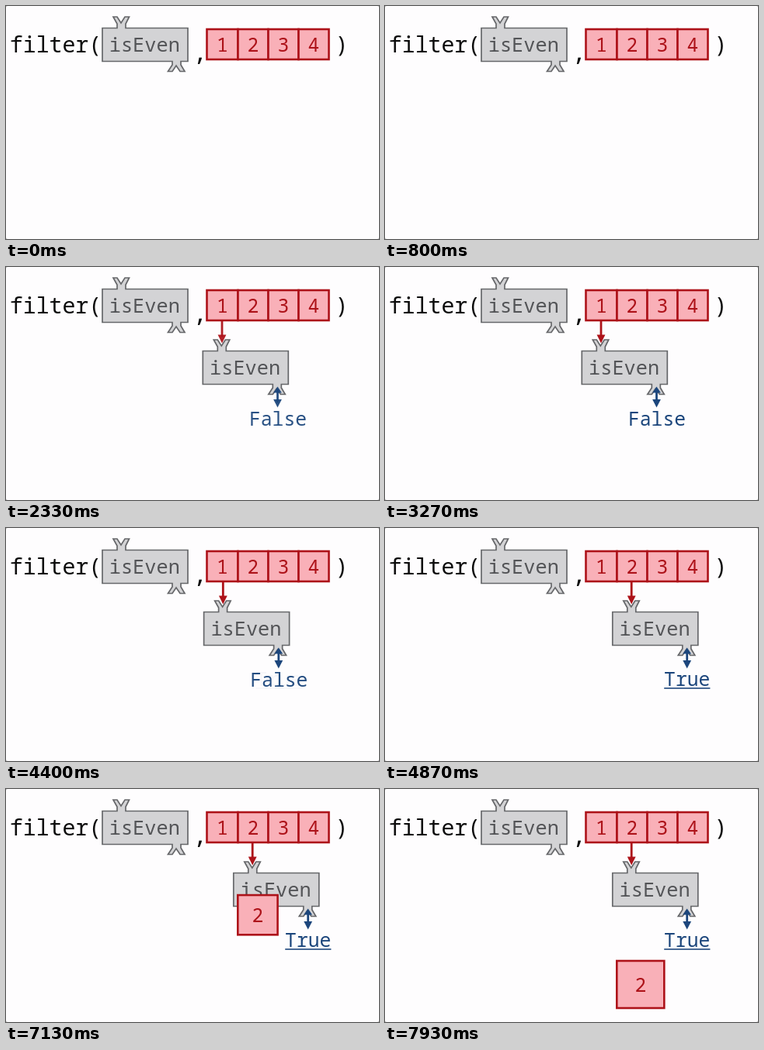
An HTML page with a canvas for the animation above (8 s loop, 480x301 px).

```html
<!DOCTYPE html>
<html lang="en">
<head>
<meta charset="utf-8">
<title>filter(isEven, list)</title>
<style>
html, body { margin: 0; width: 100%; height: 100%; overflow: hidden; background: #fefdfe; }
canvas { display: block; width: 480px; height: 301px; }
</style>
</head>
<body>
<canvas id="stage"></canvas>
<script>
const W = 480, H = 301, LOOP = 8000;
const RED = '#ad1219', PINK = '#f9b0b8', BLUE = '#1c467c';
const GREY = '#d3d3d5', EDGE = '#66676a', LABEL = '#535457', INK = '#0c0c0c';
const SMALL = 24.7, NAME = 25.3, LARGE = 28.2;

const canvas = document.getElementById('stage');
const ctx = canvas.getContext('2d');
const ratio = window.devicePixelRatio || 1;
canvas.width = Math.round(W * ratio);
canvas.height = Math.round(H * ratio);
ctx.scale(ratio, ratio);

// Outline of the function block, hooks included, at its first place
const BLOCK = [
  [124, 28.5], [143, 28.5], [143, 23], [138, 14], [143, 14], [148, 22], [153, 14],
  [158.5, 14], [154, 23], [154, 28.5], [234, 28.5], [234, 71.5], [225, 71.5],
  [225, 76], [230, 84.5], [224, 84.5], [219, 77], [214, 84.5], [208.5, 84.5],
  [214, 76], [214, 71.5], [124, 71.5]
];
const FIRST = { x: 129.3, y: 80 };
const SECOND = { x: 168.8, y: 80 };
const COLS = [258.5, 298.5, 337.5, 376.5, 415.5];

const clamp = v => Math.min(1, Math.max(0, v));
const span = (t, start, length) => clamp((t - start) / length);
const ease = p => (1 - Math.cos(Math.PI * p)) / 2;
const mix = (a, b, p) => a + (b - a) * p;

function text(str, x, y, size, color) {
  ctx.font = `${size}px "Noto Sans Mono", monospace`;
  ctx.textAlign = 'center';
  ctx.textBaseline = 'alphabetic';
  ctx.fillStyle = color;
  ctx.fillText(str, x, y);
}

function polygon(points) {
  ctx.beginPath();
  points.forEach(p => ctx.lineTo(p[0], p[1]));
  ctx.closePath();
}

function block(dx, dy) {
  ctx.save();
  ctx.translate(dx, dy);
  polygon(BLOCK);
  ctx.fillStyle = GREY;
  ctx.fill();
  ctx.strokeStyle = EDGE;
  ctx.lineWidth = 1.7;
  ctx.stroke();
  text('isEven', 178.3, 59.1, NAME, LABEL);
  ctx.restore();
}

function cell(x, y, w, h, digit) {
  ctx.fillStyle = PINK;
  ctx.fillRect(x, y, w, h);
  ctx.strokeStyle = RED;
  ctx.lineWidth = 2.6;
  ctx.strokeRect(x, y, w, h);
  text(digit, x + w / 2, y + h / 2 + 9.6, SMALL, RED);
}

function head(x, tip, size, color) {
  polygon([[x - 5.4, tip - size], [x + 5.4, tip - size], [x, tip]]);
  ctx.fillStyle = color;
  ctx.fill();
}

function shaft(x, top, bottom, color) {
  ctx.fillStyle = color;
  ctx.fillRect(x - 1.4, top, 2.8, bottom - top);
}

function arrows(shift) {
  const inX = 278 + shift, outX = 349.5 + shift;
  shaft(inX, 69, 90, RED);
  head(inX, 98.5, 11, RED);
  shaft(outX, 158, 175, BLUE);
  head(outX, 181.5, 10.5, BLUE);
  head(outX, 154.5, -8, BLUE);
}

function background() {
  ctx.fillStyle = '#a8a8a8';
  ctx.fillRect(0, 0, W, H);
  ctx.fillStyle = '#fefdfe';
  ctx.beginPath();
  ctx.roundRect(0, 0, W, H, 2);
  ctx.fill();
}

function call() {
  text('filter(', 64, 60, LARGE, INK);
  text(',', 249.5, 70.5, 31, INK);
  text(')', 432, 60, LARGE, INK);
  block(0, 0);
  for (let i = 0; i < 4; i++) {
    cell(COLS[i], 30, COLS[i + 1] - COLS[i], 39, String(i + 1));
  }
}

function results(shift, shown, swap) {
  ctx.globalAlpha = shown;
  arrows(shift);
  ctx.globalAlpha = shown * (1 - swap);
  text('False', 350 + shift, 204.6, SMALL, BLUE);
  ctx.globalAlpha = swap;
  text('True', 349.5 + shift, 203.7, SMALL, BLUE);
  ctx.fillStyle = BLUE;
  ctx.fillRect(320 + shift, 206.2, 59.2, 1.6);
  ctx.globalAlpha = 1;
}

function draw(t) {
  background();
  call();

  if (t > 1850) {
    const out = ease(span(t, 1850, 470));
    const next = ease(span(t, 4340, 520));
    block(mix(FIRST.x * out, SECOND.x, next), mix(FIRST.y * out, SECOND.y, next));
    results(39.2 * next, span(t, 2190, 150), next);
  }

  if (t > 6868) {
    const drop = ease(span(t, 6868, 490));
    const size = mix(39, 61, drop);
    cell(298.3, mix(30, 222, drop), size, size, '2');
  }
}

function tick() {
  draw(performance.now() % LOOP);
  requestAnimationFrame(tick);
}
tick();
</script>
</body>
</html>
```
